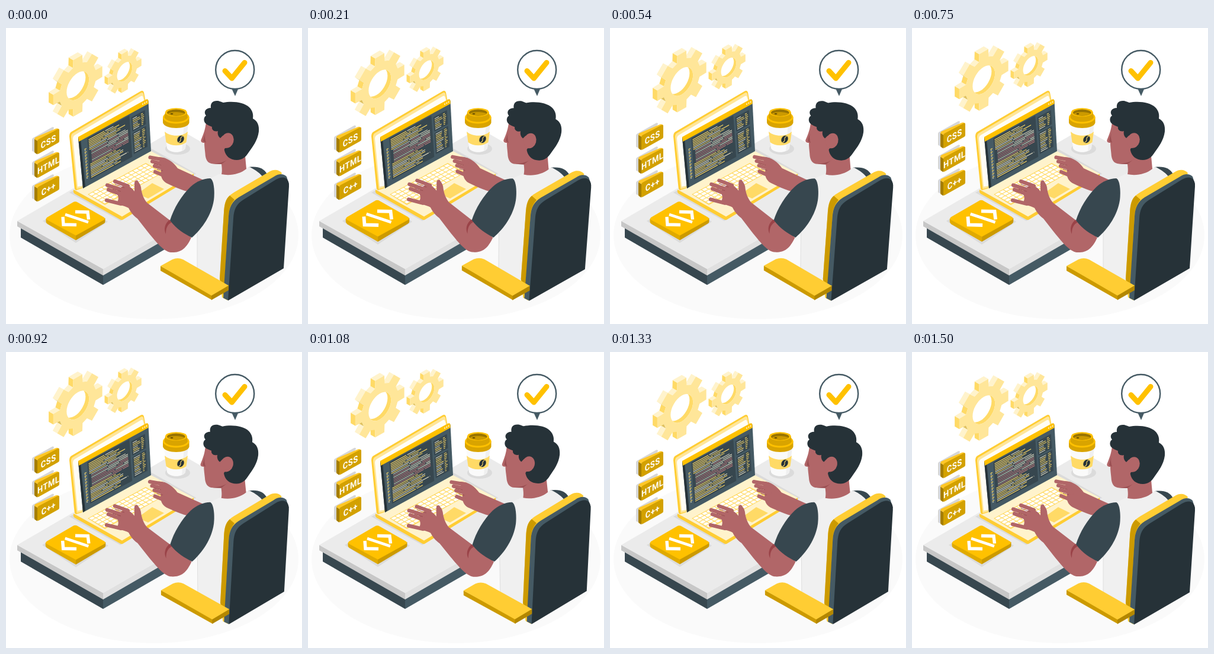
Write an HTML page that moves like this. It is 500 px wide and 500 px high and loops after 1540 ms.

```html
<!DOCTYPE html>
<html lang="en">
<head>
<meta charset="utf-8">
<title>Coding at a desk</title>
<style>
html, body { margin: 0; width: 100%; height: 100%; overflow: hidden; background: #fff; }
svg { display: block; width: 100%; height: 100%; }
.skin { fill: #b16668; }
.finger { fill: none; stroke: #b16668; stroke-width: 6.2; stroke-linecap: round; }
.tag { font: 700 15px Roboto, Arial, sans-serif; letter-spacing: .5px; fill: #fff; text-anchor: middle; }
</style>
</head>
<body>
<svg viewBox="0 0 500 500">
  <ellipse cx="250" cy="350" rx="244" ry="142" fill="#fafafa"/>

  <g id="desk">
    <path d="M25 336L164 415V434L25 354Z" fill="#37474f"/>
    <path d="M164 415L433 260V279L164 434Z" fill="#455a64"/>
    <path d="M19 326L164 407V418L19 335Z" fill="#c7c7c7"/>
    <path d="M164 407L433 252V262L164 418Z" fill="#e0e0e0"/>
    <path d="M19 326L289 169L433 252L164 407Z" fill="#ebebeb"/>
  </g>

  <g id="cup">
    <ellipse cx="290" cy="204" rx="21" ry="10" fill="#dbdbdb"/>
    <path d="M267 160L272 203C276 212 299 212 303 203L308 160Z" fill="#fafafa"/>
    <path d="M301 160L297 208Q302 206 303 203L308 160Z" fill="#f0f0f0"/>
    <path d="M268 175C277 184 298 184 307 175L304.500 193C296 200 279 200 270.500 193Z" fill="#ffda66"/>
    <g transform="rotate(35 295 188)">
      <ellipse cx="295" cy="188" rx="5.300" ry="6.700" fill="#263238"/>
      <path d="M295 181.500Q292.500 185 295 188T295 194.500" fill="none" stroke="#ffda66" stroke-width="1.100"/>
    </g>
    <path d="M265 151V160C268 172 307 172 309.500 160V151Z" fill="#d9a400"/>
    <ellipse cx="287.300" cy="151" rx="22.300" ry="10.500" fill="#ffc100"/>
    <path d="M269 142L267.500 151C272 161 303 161 307 151L305.500 142Z" fill="#d9a400"/>
    <ellipse cx="287.300" cy="142.500" rx="18.300" ry="7.300" fill="#ffc100"/>
    <ellipse cx="287.300" cy="143" rx="15.300" ry="5.400" fill="#997400"/>
    <path d="M273 145C278 141 296 141 302 145C297 149.500 278 149.500 273 145Z" fill="#cc9a00"/>
    <ellipse cx="280" cy="145" rx="2.500" ry="1" fill="#5f4800"/>
  </g>

  <g id="laptop">
    <path d="M107 278L246 204L321 246L193 326Z" fill="#dbdbdb"/>
    <path d="M114 273L196 318L317 246V251L197 324Q195 325 192 323L116 280Q113 278 114 273Z" fill="#ffcd33"/>
    <path d="M115 273L243 207L317 246L196 318.500Z" fill="#fff3cc"/>
    <path d="M138 281L236 228L266 244L167 299Z" fill="#ffda66"/>
    <g id="keys" transform="matrix(1 -.536 1.750 1 139 281)"/>
    <path d="M222 280L247 262L267 272L240 288Z" fill="#ffda66"/>
    <path d="M118 274Q116 273 115.500 269L107 183Q107 177 111 175L227 107Q232 104.500 233 109L237 130L128 271Z" fill="#ffcd33"/>
    <path d="M119.500 272L110 184Q110 179 113 177.500L228 109.500Q231 108 232 111L236 130L128 270Z" fill="#ffe699"/>
    <path d="M121 268L113 187Q113 183 116 181L228 115Q231 114 231.500 117L235 130L128 267Z" fill="#fffdf5"/>
    <path d="M122 185L237 121Q240 120 240.500 123L245 208L130 271Z" fill="#455a64"/>
    <path d="M122 185L126 188L134 268L130 271Z" fill="#263238"/>
    <path d="M122 184L236 121Q240 119 240.500 123V128L123 192Z" fill="#ffc100"/>
    <g fill="#fff"><circle cx="231" cy="128.500" r="1"/><circle cx="234.300" cy="126.700" r="1"/><circle cx="237.500" cy="125" r="1"/></g>
    <g id="code" transform="matrix(1 -.545 .07 1 123 190)"/>
  </g>

  <g id="tile">
    <path d="M62 326L118 295L172 327L118 363Z" fill="#dbdbdb"/>
    <path d="M67.500 322L118 346V358.500L70 331Q67.500 329.500 67.500 327Z" fill="#e0aa00"/>
    <path d="M118 346L167.500 321V327Q167.500 329 165 330.500L118 358.500Z" fill="#cc9a00"/>
    <path d="M70 319.500L113 294.500Q117 292 121 294.500L165 319.500Q169 322 165 324.500L118 350.500L70 324.500Q66 322 70 319.500Z" fill="#ffc100"/>
    <g fill="none" stroke="#fff" stroke-width="5.400">
      <path d="M96 319L97 332L119 332.500"/>
      <path d="M117 310.500L138 311L139.500 323.500"/>
      <path d="M100 315L139 328" stroke-width="4.600"/>
    </g>
  </g>

  <g id="tags" class="float"></g>
  <g id="gears" class="float"></g>

  <g id="bubble">
    <path d="M380.500 101L387 115L393 101Z" fill="#455a64"/>
    <circle cx="386.700" cy="70.500" r="32.500" fill="#fff" stroke="#455a64" stroke-width="2.400"/>
    <path d="M370 72.500L381.500 85L403 58.500" fill="none" stroke="#ffc100" stroke-width="9" stroke-linecap="round" stroke-linejoin="round"/>
  </g>

  <g id="person">
    <path class="skin" d="M258 218C272 218 283 227 290 237L336 258L314 278C295 274 280 266 271 262C264 258 260 250 262 240Z"/>
    <path class="finger" d="M243.500 218.500L268 223M247 225.500L268 230M251 233L270 238M252 243L266 249"/>
    <path d="M250 229L262 232M255 238.500L265 241" stroke="#9a4f52" stroke-width="1" fill="none"/>

    <path d="M410 235C426 233 436 237 441 247L425 260Z" fill="#37474f"/>
    <path d="M345 254L364 245C378 250 396 248 407 236L412 235C422 240 430 246 434 252L385 290L372 440L323 420V345Z" fill="#f0f0f0"/>
    <path d="M323 345V415" stroke="#dedede" fill="none"/>
    <path class="skin" d="M338 158C337 170 334 178 329.500 189C328.500 192 331 194 335 194C335 200 336 206 336.500 212C337 223 341 229 350 229.500L364 230C365 238 365 243 364 247C378 250 395 247 406 238L404 216L380 150Z"/>
    <path d="M338 176C336 180 335 184 338 194L333 191C334 186 335 181 338 176Z" fill="#9a4f52"/>
    <path d="M350 229.500L364 230L377 220C371 226 362 228 350 229.500Z" fill="#9a4f52"/>
    <path d="M337 161C333 157 334 150 338 148C333 142 337 135 346 135C345 127 349 123 356 123C361 123 363 125 367 126C382 123 402 125 411 134C417 140 418 147 417 153C425 157 428 165 427 175C425 190 417 200 410 210C405 218 399 223 390 223C378 223 371 216 369 207C368 203 371 202 376 202C386 190 380 177 366 182L362 186C358 183 357 178 358 174C352 176 347 172 348 167C344 165 340 164 337 161Z" fill="#263238"/>
    <ellipse class="skin" cx="374" cy="190" rx="10.500" ry="13" transform="rotate(15 374 190)"/>

    <path class="skin" d="M200 264C208 267 213 270 217 276L217 262C220 254 227 262 228 269C229 280 233 289 238 295L277 325L313 354C304 374 294 380 278 379C266 377 254 362 240 345L222 322C214 316 210 310 207 304C200 300 190 299 186 297C191 291 191 284 186 278Z"/>
    <path class="finger" d="M184 259L206 267M171 265.500L198 274M173 273L195 281M170 291L194 297"/>
    <path class="finger" d="M220.500 260.500L224 275"/>
    <path d="M184 264L200 270M180 272L194 276" stroke="#9a4f52" stroke-width="1" fill="none"/>
    <path d="M276 324C268 331 266 340 270 348C270 339 272 332 280 328Z" fill="#9a4348"/>
    <path d="M345 254C351 256 353 275 351 291C347 316 332 338 314 354C302 348 288 340 277 325C283 305 297 282 312 268C322 259 334 254 345 254Z" fill="#37474f"/>

    <path d="M361 424L368 312C369 290 374 284 388 276L446 242C454 238 462 240 466 245L374 460L365 455Z" fill="#ffcd33"/>
    <path d="M361 424L368 312C369 298 371 289 378 283L386 290C379 299 377 305 376 318L368 452Z" fill="#cc9a00"/>
    <path d="M367 456L376 318C377 302 382 293 393 286L452 251.500C461 245 469 246 474 251L478 264L375 460Z" fill="#455a64"/>
    <path d="M375 460.500L384 322C385 305 390 297 401 290L456 256C470 248 479 254 478 268L469 406Z" fill="#263238"/>

    <path d="M261 402L348 450V459.500L261 410Z" fill="#cc9a00"/>
    <path d="M347 451L376 434V443L347 459.500Z" fill="#b38700"/>
    <path d="M261 402L281 391Q290 387 299 391L376 435L347 452Z" fill="#ffcd33"/>
  </g>
</svg>
<script>
const NS = 'http://www.w3.org/2000/svg';
const $ = id => document.getElementById(id);
const add = (parent, name, attrs, text) => {
  const el = document.createElementNS(NS, name);
  for (const k in attrs) el.setAttribute(k, attrs[k]);
  if (text) el.textContent = text;
  return parent.appendChild(el);
};
const rect = (parent, x, y, width, height, fill) => add(parent, 'rect', { x, y, width, height, fill });

let seed = 11;
const rnd = () => (seed = seed * 16807 % 2147483647) / 2147483647;

function drawKeys() {
  for (let r = 0; r < 5; r++)
    for (let c = 0; c < 13; c++) rect($('keys'), c * 7.46 + .6, r * 3.2 + .3, 6.2, 2.5, '#fff');
}

function drawCode() {
  const g = $('code'), gold = '#ffda66', pale = '#e6e0c8', red = '#c07b7d';
  rect(g, 14, 4, 71, 70, '#37474f');
  rect(g, 88, 9, 23, 24, '#37474f');
  rect(g, 88, 36, 23, 35, '#37474f');
  for (let v = 7; v < 72; v += 2.75) {
    const mid = v > 25 && v < 48;
    const end = mid ? 81 : 58 + rnd() * 23;
    let x = mid ? 19 : 16;
    while (x < end) {
      const w = Math.min(end - x, 14 + rnd() * (mid ? 45 : 28));
      rect(g, x, v, w, 1.15, mid ? (rnd() < .8 ? red : pale) : rnd() < .65 ? gold : pale);
      x += w + 1.5;
    }
  }
  for (let v = 19; v < 68; v += 5.2) {
    rect(g, 8, v, 3.5, 1.3, gold);
    rect(g, 8, v + 2.4, 2.5, 1, pale);
  }
  for (let v = 12; v < 69; v += 2.9)
    if (v < 31 || v > 37) {
      rect(g, 90, v, 7 + rnd() * 6, 1.1, rnd() < .5 ? gold : pale);
      rect(g, 104, v, 2 + rnd() * 4, 1.1, gold);
    }
}

function drawTag(label, dy) {
  const g = add($('tags'), 'g', { transform: `translate(0 ${dy})` });
  const part = (d, fill) => add(g, 'path', { d, fill });
  part('M44 188Q44 186 46 185L78 167Q81 166 81 169L60 195L47 209L44 207Z', '#d6d6d6');
  part('M48 187L53 190V213L49 210.500Q48 210 48 208.500Z', '#a67e00');
  part('M48 187Q48 185 50 184L84 169.500Q86 168.500 88 169.500L90 171L53 190Z', '#ffc727');
  part('M53 191Q53 188.500 55 187.500L87 170.500Q90 169 90 172V190.500Q90 192.500 88 193.500L55 212Q53 213 53 210.500Z', '#d3a100');
  add(g, 'text', { class: 'tag', transform: 'matrix(.866 -.5 0 1 71.700 196.500)' }, label);
}

// Extruded gear in an isometric plane; d is its depth in plane units
function drawGear(cx, cy, R, d) {
  const g = add($('gears'), 'g', { transform: `matrix(.866 -.5 0 1 ${cx} ${cy})` });
  const pts = [];
  for (let i = 0; i < 8; i++)
    for (const [a, k] of [[-15, .74], [-10.5, 1], [10.5, 1], [15, .74]]) {
      const t = (i * 45 + a) * Math.PI / 180;
      pts.push([R * k * Math.cos(t), R * k * Math.sin(t)]);
    }
  pts.forEach(([x, y], i) => {
    const [X, Y] = pts[(i + 1) % pts.length];
    const len = Math.hypot(X - x, Y - y), nx = (Y - y) / len, ny = (x - X) / len;
    if (nx + ny >= 0) return;
    const fill = ny > .1 ? '#e0c260' : nx < -.75 ? '#ffda66' : '#fff3cc';
    add(g, 'path', { d: `M${x} ${y}L${X} ${Y}l${-d} ${-d}L${x - d} ${y - d}Z`, fill });
  });
  const h = R * .45;
  add(g, 'circle', { r: h, fill: '#ffda66' });
  add(g, 'circle', { cx: -d * .75, cy: -d * .75, r: h, fill: '#fff' });
  add(g, 'path', {
    d: `M${pts.join('L')}ZM${h} 0A${h} ${h} 0 1 0 ${-h} 0A${h} ${h} 0 1 0 ${h} 0Z`,
    fill: '#ffe699', 'fill-rule': 'evenodd'
  });
}

drawKeys();
drawCode();
['CSS', 'HTML', 'C++'].forEach((s, i) => drawTag(s, i * 40 + .6));
drawGear(121.3, 97.6, 48.6, 9);
drawGear(200.5, 74, 33.2, 6.6);

// Linear interpolation through [position, value] stops
function track(p, stops) {
  for (let i = 1; i < stops.length; i++) {
    const [a, u] = stops[i - 1], [b, v] = stops[i];
    if (p <= b) return u + (v - u) * (p - a) / (b - a);
  }
  return stops[stops.length - 1][1];
}

const LOOP = 1540, STEP = 1000 / 24;
const LIFT = [[0, 0], [.5, -10], [1, 0]];
const SWAY = [[0, 0], [.25, 1], [.75, -1], [1, 0]];
const BEAT = [[0, 1], [.14, 1.075], [.28, 1], [.36, 1], [.5, 1.075], [.64, 1], [1, 1]];
const floats = document.querySelectorAll('.float');

function draw(ms) {
  const step = Math.min(36, Math.floor((ms % LOOP + 4.9) / STEP));
  const p = step / 36;
  floats.forEach(el => el.setAttribute('transform', `translate(0 ${track(p, LIFT)})`));
  $('person').setAttribute('transform', `rotate(${track(p, SWAY)} 322 291.5)`);
  $('tile').setAttribute('transform', `translate(117.5 325.5) scale(${track(p, BEAT)}) translate(-117.5 -325.5)`);
}

let start;
function tick(now) {
  start ??= now;
  draw(now - start);
  requestAnimationFrame(tick);
}
draw(0);
requestAnimationFrame(tick);
</script>
</body>
</html>
```
